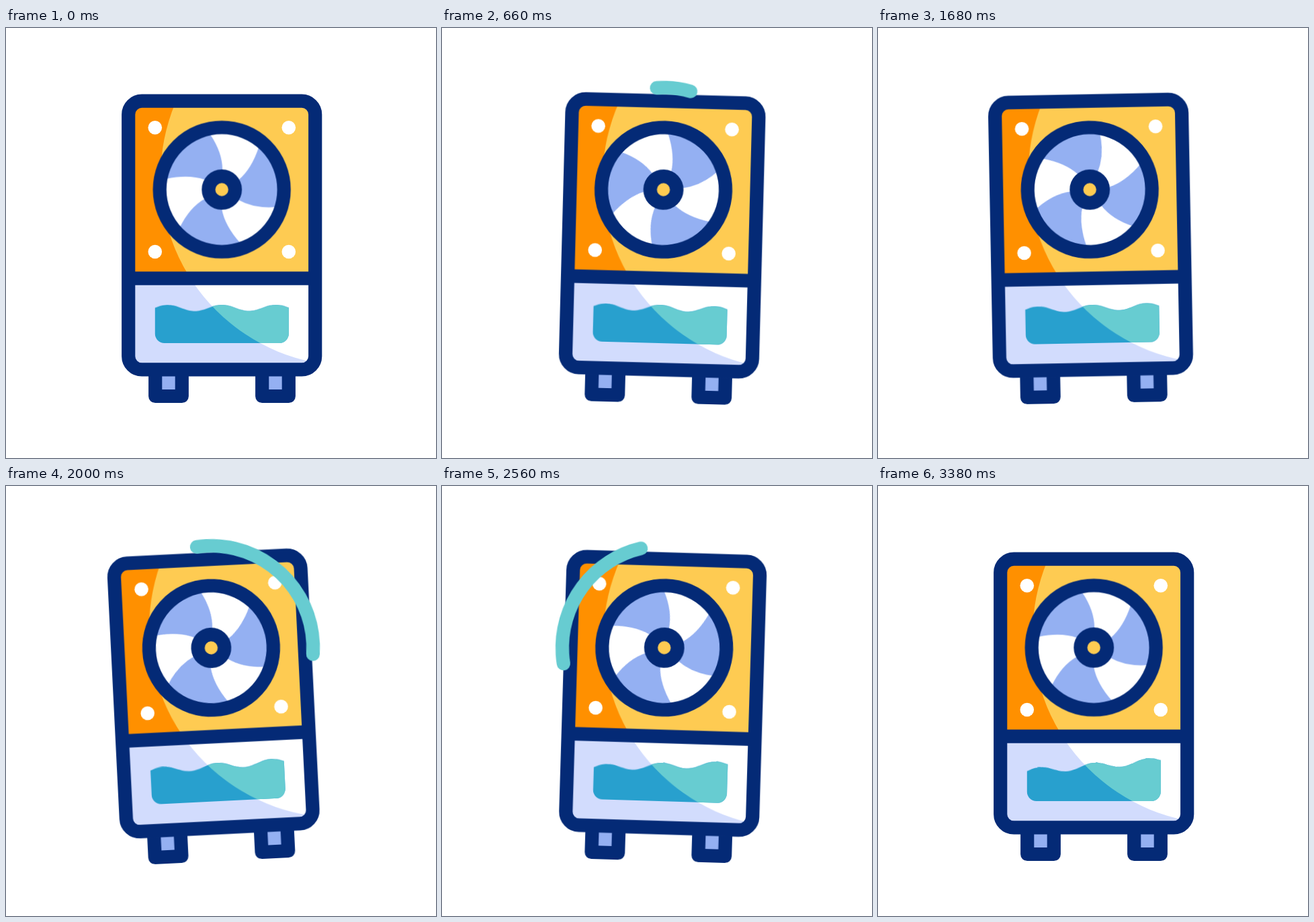
Write an HTML page that moves like this. It is 640 by 640 pixels and loops after 3580 ms.

```html
<!DOCTYPE html>
<html lang="en">
<head>
<meta charset="utf-8">
<title>Cooling unit</title>
<style>
  html, body { margin: 0; width: 100%; height: 100%; overflow: hidden; background: #fff; }
  svg { display: block; width: 100vw; height: 100vh; }

  @property --head { syntax: "<number>"; inherits: false; initial-value: 0; }
  @property --tail { syntax: "<number>"; inherits: false; initial-value: 0; }

  .line { fill: none; stroke: #042a76; stroke-width: 20.2; stroke-linejoin: round; }
  .unit, .fan, .wave, .sweep {
    animation: 3580ms linear infinite both;
    animation-timing-function: cubic-bezier(.33, 0, .67, 1);
  }
  .unit { animation-name: tilt; transform-origin: 321.2px 558px; }
  .fan { animation-name: spin; transform-origin: 0 0; }
  .wave { animation-name: slosh; transform-origin: 0 0; }
  .sweep {
    animation-name: head, tail, blink;
    fill: none;
    stroke: #67ccd1;
    stroke-width: 20.2;
    stroke-linecap: round;
    stroke-dasharray: calc(1px * (var(--head) - var(--tail))) 720px;
    stroke-dashoffset: calc(-1px * var(--tail));
  }

  @keyframes tilt {
    0% { transform: rotate(0deg); }
    5.03% { transform: rotate(0deg); animation-timing-function: cubic-bezier(.4, 0, .43, 1); }
    27.93% { transform: rotate(2deg); }
    30.17% { transform: rotate(2deg); animation-timing-function: cubic-bezier(.65, 0, .67, 1); }
    54.75% { transform: rotate(-2.9deg); }
    74.3% { transform: rotate(2deg); animation-timing-function: cubic-bezier(.3, 0, .27, 1); }
    94.41%, 100% { transform: rotate(0deg); }
  }
  @keyframes spin {
    0% { transform: rotate(0deg); }
    5.03% { transform: rotate(0deg); animation-timing-function: cubic-bezier(.5, 0, .5, 1); }
    78.77%, 100% { transform: rotate(-720deg); }
  }
  @keyframes slosh {
    0%, 5.03% { transform: skewY(0deg); }
    30.45% { transform: skewY(-8deg); }
    67.88% { transform: skewY(8deg); animation-timing-function: cubic-bezier(.25, 0, .385, 1); }
    94.41%, 100% { transform: skewY(0deg); }
  }
  @keyframes head {
    0% { --head: 0; }
    16.76% { --head: 0; animation-timing-function: cubic-bezier(.3, .2, .68, 1); }
    41.9%, 46.5% { --head: 360; }
    46.6% { --head: 0; }
    49.08% { --head: 0; animation-timing-function: cubic-bezier(.3, .2, .68, 1); }
    74.22%, 100% { --head: 360; }
  }
  @keyframes tail {
    0%, 25.14% { --tail: 0; }
    46.37%, 46.5% { --tail: 360; }
    46.6%, 57.46% { --tail: 0; }
    78.69%, 100% { --tail: 360; }
  }
  @keyframes blink {
    0% { visibility: hidden; animation-timing-function: step-end; }
    16.8% { visibility: visible; animation-timing-function: step-end; }
    46.3% { visibility: hidden; animation-timing-function: step-end; }
    49.12% { visibility: visible; animation-timing-function: step-end; }
    78.6%, 100% { visibility: hidden; animation-timing-function: step-end; }
  }
</style>
</head>
<body>
<svg viewBox="0 0 640 640">
  <defs>
    <clipPath id="panel"><rect x="182.2" y="108.7" width="278" height="400" rx="20"/></clipPath>
    <clipPath id="light"><circle cx="512.4" cy="220.6" r="282.3"/></clipPath>
    <clipPath id="tank"><path d="M221.8 380H420.8V455a14 14 0 0 1-14 14H235.8a14 14 0 0 1-14-14Z"/></clipPath>
    <path id="blade" d="M-25-14.5Q-49-23-82.5-16A84 84 0 0 1-17.4-82.2Q1-55 1-29Z"/>
    <g id="foot">
      <rect x="-19.8" y="500" width="39.6" height="48" fill="#94b0f2"/>
      <rect class="line" x="-19.8" y="500" width="39.6" height="48"/>
    </g>
    <g id="water" clip-path="url(#tank)">
      <g transform="translate(321.2 416.7)"><path class="wave" id="surface"/></g>
    </g>
  </defs>

  <g class="unit">
    <use href="#foot" x="242"/>
    <use href="#foot" x="401"/>

    <g clip-path="url(#panel)">
      <path fill="#ff9000" d="M180 100H465V373H180Z"/>
      <path fill="#d2dcfd" d="M180 373H465V512H180Z"/>
      <g clip-path="url(#light)">
        <path fill="#fecb52" d="M180 100H465V373H180Z"/>
        <path fill="#fff" d="M180 373H465V512H180Z"/>
      </g>
    </g>
    <use href="#water" fill="#28a0ce"/>
    <g clip-path="url(#light)"><use href="#water" fill="#67ccd1"/></g>

    <rect class="line" x="182.2" y="108.7" width="278" height="399.7" rx="20"/>
    <path class="line" d="M182 372.7H460"/>
    <g fill="#fff">
      <circle cx="221.8" cy="148.3" r="10.3"/>
      <circle cx="420.8" cy="148.3" r="10.3"/>
      <circle cx="221.8" cy="333" r="10.3"/>
      <circle cx="420.8" cy="333" r="10.3"/>
    </g>

    <g transform="translate(321.2 240.5)">
      <circle r="92.5" fill="#fff"/>
      <g class="fan" fill="#94b0f2">
        <use href="#blade"/>
        <use href="#blade" transform="rotate(120)"/>
        <use href="#blade" transform="rotate(240)"/>
      </g>
      <circle class="line" r="92.5"/>
      <circle r="20" fill="#fecb52"/>
      <circle class="line" r="19.8"/>
      <path class="sweep" pathLength="360" transform="rotate(-5.3)"
            d="M0-151.8A151.8 151.8 0 0 1 0 151.8A151.8 151.8 0 0 1 0-151.8"/>
    </g>
  </g>
</svg>
<script>
  // Sine surface; the skew tilts it and the tank clips it.
  let d = "M-110 100";
  for (let x = -110; x <= 110; x += 2) {
    d += `L${x} ${(-4.7 * Math.cos(x * Math.PI / 40.2)).toFixed(2)}`;
  }
  document.getElementById("surface").setAttribute("d", d + "L110 100Z");
</script>
</body>
</html>
```
